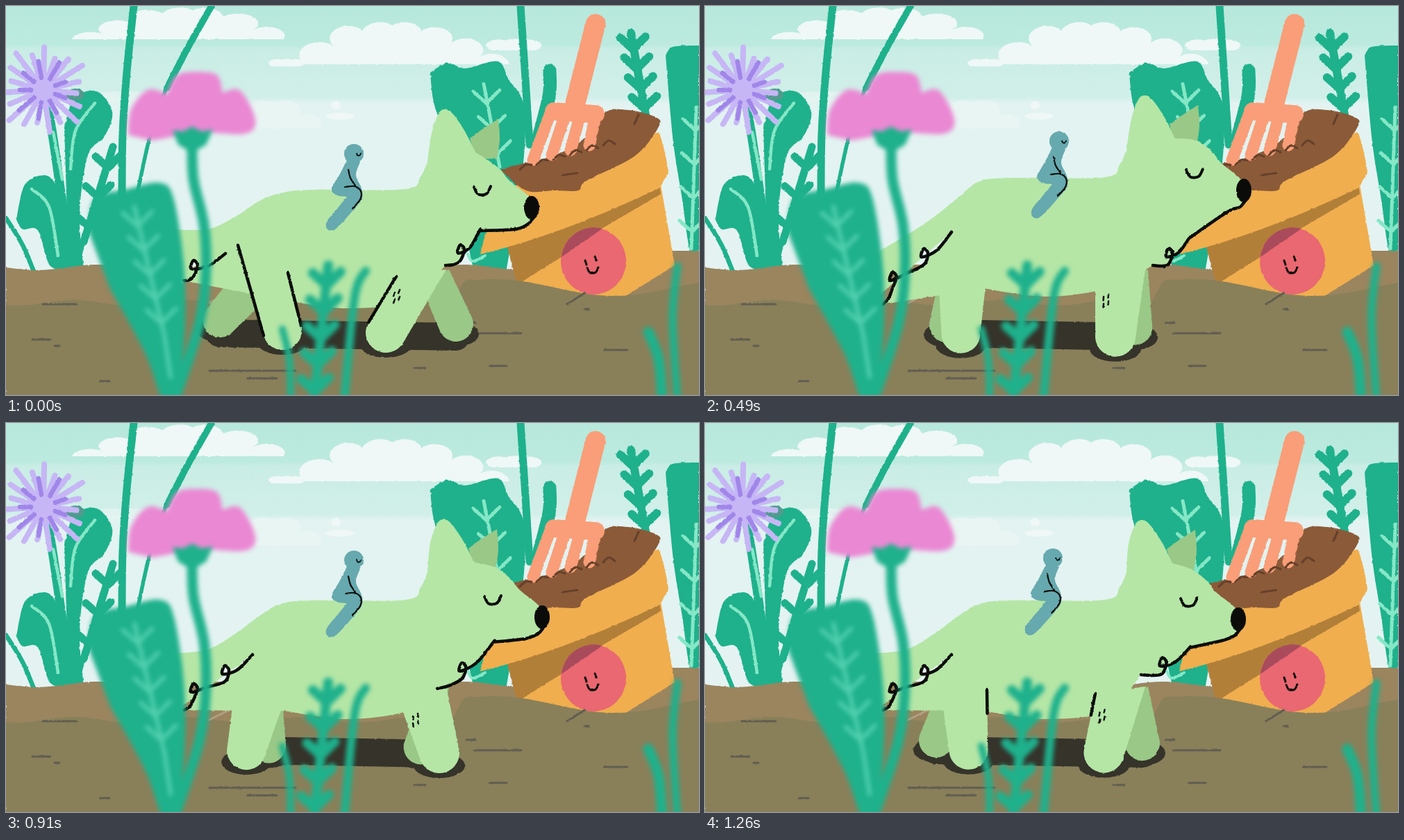
Animation, 998 px wide and 561 px high, one loop 1470 ms. Source, as an HTML page:

```html
<!DOCTYPE html>
<html lang="en">
<head>
<meta charset="utf-8">
<title>Garden walk</title>
<style>
html, body { margin: 0; width: 100%; height: 100%; overflow: hidden; background: #e5f3f2; }
svg { display: block; width: 100vw; height: 100vh; }
</style>
</head>
<body>
<svg viewBox="0 0 998 561" preserveAspectRatio="none">
  <defs>
    <linearGradient id="sky" x1="0" y1="0" x2="0" y2="1">
      <stop offset="0" stop-color="#b7e8dc"/>
      <stop offset=".1" stop-color="#bceadf"/>
      <stop offset=".11" stop-color="#c9ede5"/>
      <stop offset=".235" stop-color="#d1efe9"/>
      <stop offset=".25" stop-color="#e2f3f1"/>
      <stop offset="1" stop-color="#e6f3f3"/>
    </linearGradient>
    <filter id="rough" filterUnits="userSpaceOnUse" x="-10" y="-10" width="1018" height="601" color-interpolation-filters="sRGB">
      <feTurbulence type="fractalNoise" baseFrequency=".22" numOctaves="2" seed="4"/>
      <feDisplacementMap in="SourceGraphic" scale="2.5" xChannelSelector="R" yChannelSelector="G"/>
    </filter>
    <filter id="soft" filterUnits="userSpaceOnUse" x="-20" y="-20" width="1038" height="621" color-interpolation-filters="sRGB">
      <feGaussianBlur stdDeviation="3"/>
    </filter>
  </defs>
  <rect width="998" height="561" fill="url(#sky)"/>
  <g id="back" filter="url(#rough)"></g>
  <g id="dog" filter="url(#rough)"></g>
  <g id="front" filter="url(#soft)"></g>
</svg>
<script>
const GREEN = '#1eb18c', MINT = '#85e7c6', INK = '#0b0c0a', BOTTOM = 580;
const COAT = '#b5e6a6', FAR = '#9ac887', RIDER = '#66a9ae', SHADE = '#35332a';
const SOIL = '#8b5a39', CLAY = '#f0ae4e', PEACH = '#f99e78', CLOUD = '#eff8f6', PINK = '#ea88d3';

const range = (n, make) => Array.from({ length: n }, (_, i) => make(i));
const mix = (a, b, t) => a.map((v, k) => v + (b[k] - v) * t);
const at = ([x, y], dx, dy) => [x + dx, y + dy];

// Smooth curve through points; "/" makes a corner, "|" starts a new subpath.
function curve(text) {
  return text.split('|').map(part => {
    let d = '', last;
    for (const run of part.split('/')) {
      const p = run.trim().split(/\s+/).map(q => q.split(',').map(Number));
      if (last) p.unshift(last); else d = 'M' + p[0];
      for (let i = 0; i < p.length - 1; i++) {
        const a = p[i], b = p[i + 1], before = p[i - 1] || a, after = p[i + 2] || b;
        const c1 = a.map((v, k) => v + (b[k] - before[k]) / 6);
        const c2 = b.map((v, k) => v - (after[k] - a[k]) / 6);
        d += `C${c1} ${c2} ${b}`;
      }
      last = p.at(-1);
    }
    return d;
  }).join('');
}
const path = (d, fill) => `<path d="${d}" fill="${fill}"/>`;
const shape = (pts, fill) => path(curve(pts) + 'Z', fill);
const poly = (pts, fill) => path(`M${pts}Z`, fill);
const line = (pts, width = 4, color = INK) =>
  `<path d="${curve(pts)}" fill="none" stroke="${color}" stroke-width="${width}" stroke-linecap="round" stroke-linejoin="round"/>`;
const oval = (x, y, rx, ry, fill) => `<ellipse cx="${x}" cy="${y}" rx="${rx}" ry="${ry}" fill="${fill}"/>`;
const smile = (x, y, r, width) => line(`${x - r},${y - r * .4} ${x - r * .5},${y + r * .45} ${x + r * .5},${y + r * .4} ${x + r},${y - r * .5}`, width);

// Stem from tip to base with pairs of arms pointing up and outward.
function frond(x1, y1, x2, y2, pairs, arm, width, color) {
  const arms = range(pairs, i => {
    const [x, y] = mix([x1, y1], [x2, y2], (i + .5) / pairs);
    return `|${x - arm},${y - arm * .9}/${x},${y}/${x + arm},${y - arm}`;
  });
  return line(`${x1},${y1 - arm * .5} ${x2},${y2}` + arms.join(''), width, color);
}

// Flat-based cloud whose bumps rise toward its peak.
function cloud(x, base, width, height, bumps, peak = .5) {
  const top = t => base - height * Math.sin(Math.PI * t ** (Math.log(.5) / Math.log(peak))) ** 1.6;
  const arcs = range(bumps, i => `A${width / bumps * .6} ${height * .3} 0 0 1 ${x + width * (i + 1) / bumps} ${top((i + 1) / bumps)}`);
  return path(`M${x},${base}${arcs.join('')}Z`, CLOUD);
}

function burst(x, y) {
  const rays = (n, turn, near, far) => range(n, i => {
    const a = turn + i * 2 * Math.PI / n;
    return [near, far(i)].map(r => `${x + Math.cos(a) * r},${y + Math.sin(a) * r}`).join(' ');
  }).join('|');
  return line(rays(19, .1, 3, i => 48 + i * 7 % 5 * 4.5), 8, '#c6b6f5')
    + line(rays(9, .35, 18, i => 34 + i * 5 % 4 * 4), 6.5, '#a086e9');
}

const clouds = () => cloud(95, 48, 304, 42, 7, .55) + cloud(430, 84, 295, 56, 7, .42)
  + cloud(384, 87, 40, 12, 3) + cloud(700, 64, 62, 18, 3)
  + `<g opacity=".5">${cloud(142, 138, 58, 14, 2) + cloud(320, 177, 130, 40, 4, .4)}</g>`
  + oval(481, 159, 21, 5, CLOUD) + oval(475, 143, 7, 6, CLOUD);

const leftPlants = () => line('184,0 174,95 168,185 167,275', 11, GREEN)
  + line('296,0 262,60 232,118', 9.5, GREEN) + line('230,120 208,185 190,266', 5.5, GREEN)
  + line('0,306 24,345 44,393', 6.5, GREEN) + line('60,145 70,205 95,385', 13, GREEN)
  + shape('84,175 98,133 130,123 153,152 142,188 118,215 106,300 112,380/ 90,372', GREEN)
  + shape('18,290 30,254 66,249 90,320 102,376/ 65,376 46,324 24,322 15,308', GREEN)
  + frond(154, 212, 112, 340, 3, 18, 11, GREEN) + line('114,330 98,390 128,380', 9, GREEN)
  + line('128,140 100,180 93,235|37,264 62,290 75,360|68,182 81,250', 4.5, MINT)
  + oval(100, 128, 13, 9, '#509b8e') + burst(54, 121);

const rightPlants = () => line('741,0 747,90 754,200', 11, GREEN)
  + line('783,93 782,130 764,200', 19, GREEN)
  + shape('611,96 636,82 662,90 708,80 724,106 746,145 744,236 720,385/ 695,392 674,381 640,210 617,143 611,96', GREEN)
  + frond(688, 122, 711, 232, 3, 19, 5, MINT) + line('665,358 672,368 690,360', 4, MINT)
  + frond(900, 48, 922, 162, 4, 18, 12, GREEN)
  + shape('950,72 960,59 998,57/ 998,352/ 985,352 974,280 962,205 955,135', GREEN)
  + frond(994, 155, 987, 350, 4, 18, 5, MINT);

function hill(height, color) {
  const top = range(51, i => `${i * 20},${height(i * 20)}`).join(' ');
  return shape(`${top}/ 1000,${BOTTOM}/ 0,${BOTTOM}`, color);
}
const farHill = x => x > 920 ? 353 : 377 + 4 * Math.sin(x / 28);
const nearHill = x => x > 640 ? 406 + 12 * Math.sin((x - 790) / 55) : 428 + 4 * Math.sin(x / 26 + 1);

function fork() {
  const tines = range(4, i => `${783 + 22 * i},157 ${759 + 27 * i},${222 - 7 * i}`).join('|');
  return line('849,26 820,140', 29, PEACH) + line('789,152 849,156', 26, PEACH) + line(tines, 17, PEACH);
}

function pot() {
  const clods = range(6, i => `${740 + 24 * i},${236 - 7 * i} ${748 + 24 * i},${229 - 7 * i} ${757 + 24 * i},${229 - 6 * i}`).join('|');
  return poly('722,340 737,402 880,426 963,374 943,258', CLAY)
    + poly('720,340 941,258 943,271 858,321 800,362 736,402', '#b27f39')
    + path('M683,358L690,330L735,258L940,182Q949,205 954,239L942,262Q800,330 683,358Z', CLAY)
    + shape('712,236 740,228 782,218 827,196 862,154 896,150 935,160 940,174 906,216 836,252 824,266 790,266 756,268 735,258', SOIL)
    + fork() + line(clods + '|905,170 911,157|801,244 822,241', 3, '#65402a');
}

const ball = () => oval(846, 368, 47, 48, '#e96871')
  + path('M859,321L800,362A47 48 0 0 1 859,321Z', '#a94b5b')
  + line('834,367 836,373|848,361 850,367', 3) + smile(845, 381, 8, 3);

const scratches = [[53, 430, 49], [38, 481, 26], [70, 490, 7], [135, 541, 14], [293, 526, 124], [348, 537, 42],
  [674, 472, 68], [663, 457, 13], [588, 522, 16], [697, 519, 24], [862, 496, 33], [833, 437, 6]];
const marks = scratches.map(([x, y, w]) => `${x},${y} ${x + w},${y}`).join('|') + '|808,430 833,414';

back.innerHTML = clouds() + leftPlants() + rightPlants() + hill(farHill, '#9a855f') + pot()
  + hill(nearHill, '#89805a') + ball() + line(marks, 3, '#615d50') + line('293,428 329,410', 3, '#b2a082');

front.innerHTML =
  shape('176,186 180,150 204,121 232,127/ 246,100 276,95 304,100 312,125/ 337,122 359,163 345,184 280,183 210,194', PINK)
  + line('268,195 270,250 285,315 288,380 278,460 242,570', 15, GREEN)
  + poly('240,179 255,181 268,174 282,181 298,178 288,200 268,212 248,200', GREEN)
  + shape('119,325 128,278 175,264 222,255 242,280 257,385 256,490 242,570/ 226,570 200,500 150,408', GREEN)
  + frond(185, 300, 228, 475, 5, 21, 6, '#50cfae') + line('228,475 237,535', 6, '#50cfae')
  + frond(464, 384, 443, 575, 5, 20, 14, GREEN)
  + line('398,466 408,510 410,570', 10, GREEN) + line('518,382 502,420 487,570', 12, GREEN)
  + line('925,470 940,510 945,570', 15, GREEN) + line('967,375 960,450 967,570', 11, GREEN);

// Hanging curls: sagging spans joined by a small loop at each inner knot.
function garland(knots) {
  const pts = [knots[0]];
  knots.slice(1).forEach((knot, i) => {
    pts.push(at(mix(knots[i], knot, .6), 2, 8));
    if (i < knots.length - 2) pts.push(at(knot, -4, 5), at(knot, -1, -7), at(knot, 5, 0), at(knot, -1, 16));
    else pts.push(knot);
  });
  return pts;
}

function leg(a, b, x, bottom, r) {
  const y = bottom - r, [mx, my] = mix(a, b, .5), len = Math.hypot(x - mx, y - my);
  const nx = (y - my) / len * r, ny = (mx - x) / len * r;
  const left = [x - nx, y - ny], right = [x + nx, y + ny];
  return { a, b, x, bottom, r, left, right, d: `M${a}L${left}A${r} ${r} 0 0 0 ${right}L${b}Z` };
}

const rider = oval(501, 213, 14, 14, RIDER)
  + shape('491,222/ 481,242 469,264 477,273 491,275/ 478,291 462,311 463,322 474,322 496,299 512,279 512,263 504,244 510,225', RIDER)
  + line('493,236 496,248 503,259|489,261 502,260 511,267 510,279 499,292', 2.2)
  + smile(508, 214, 3, 1.8);

function drawDog({ swing, rise, ear, nose, throat, chest, curls = 2, edge = 0 }) {
  const back = 264 - rise, s2 = swing * swing;
  const frontLeg = leg([562, 390], [634, 380], 602 + 55 * swing, 506 - 6 * s2, 29);
  const rearLeg = leg([334, 345], [406, 385], 361 - 37 * swing, 501 - 5 * s2, 28);
  const farFront = leg([596, 400], [638, 380], 612 - 36 * swing, 490 + 6 * swing, 25);
  const farRear = leg([342, 370], [398, 400], 358 + 50 * swing, 487 + 9 * swing, 25);
  const legs = [frontLeg, rearLeg, farFront, farRear], feet = legs.map(l => l.x);

  const tail = garland([[355, 343 - rise], [316, 357], [271, 374 + rise], [256, 396 + rise * 2]].slice(2 - curls));
  const bib = garland([throat, mix(throat, chest, .55), chest]);
  const chin = [at(nose, 2, 15), at(nose, -6, 24), at(nose, -24, 31), throat];
  const outline = [
    [240, 322 + rise * rise * .13], [290, 322 + rise * .5], [330, 304], [365, 281 - rise * .3],
    [395, back + 6], [440, back + 1], [575, back], [597, back - 18], [607, back - 40], '/',
    at(ear, -20, 34), at(ear, -10, 6), ear, at(ear, 11, 7), at(ear, 28, 32), at(ear, 43, 62), '/',
    at(nose, -68, -72), at(nose, -46, -56), at(nose, -32, -39), at(nose, -4, -16), at(nose, 6, 4), ...chin, '/',
    ...bib, '/', [580, back + 160], [490, back + 172], [400, back + 160], '/', ...tail.toReversed(), '/', [240, 410 + rise]
  ].join(' ');

  let ink = [[...chin, '/', ...bib].join(' '), tail.join(' ')].join('|');
  if (edge) ink += `|${frontLeg.a} ${mix(frontLeg.a, frontLeg.left, edge)}|${rearLeg.b} ${mix(rearLeg.b, rearLeg.right, edge)}`;
  if (edge === 1) ink += `|${rearLeg.a} ${rearLeg.left}`;

  const [sx, sy] = at(mix(frontLeg.a, frontLeg.left, .35), 12, 0);
  const spots = range(4, i => {
    const x = sx + i % 2 * 7, y = sy + (i >> 1) * 10 - i % 2 * 4;
    return `${x},${y} ${x + 2 * swing},${y + 5}`;
  }).join('|');

  return line(`${Math.min(...feet)},472 ${Math.max(...feet)},477`, 40, SHADE)
    + legs.map(l => oval(l.x, l.bottom - 11, l.r + 8, 18, SHADE)).join('')
    + shape(`${at(ear, 35, 42)} ${at(ear, 54, 28)} ${at(ear, 76, 14)}/ ${at(ear, 78, 44)} ${at(ear, 74, 72)}/ ${at(ear, 43, 70)}`, FAR)
    + path(farFront.d, FAR) + path(farRear.d, FAR)
    + shape(outline, COAT) + path(rearLeg.d, COAT) + path(frontLeg.d, COAT)
    + line(ink, 4.5) + line(spots, 2.5) + oval(...nose, 11, 17, INK) + smile(...at(nose, -71, -25), 12, 4);
}

const reach = { swing: -1, rise: 0, ear: [633, 149], nose: [757, 291], throat: [682, 324], chest: [633, 374], curls: 1, edge: 1 };
const pass = { swing: -.5, rise: 9, ear: [630, 140], nose: [768, 283], throat: [698, 324], chest: [628, 363], edge: .4 };
const stand = { swing: -.2, rise: 17, ear: [634, 129], nose: [776, 266], throat: [697, 335], chest: [645, 374] };
const stride = { swing: 1, rise: 0, ear: [634, 148], nose: [771, 287], throat: [704, 326], chest: [637, 396] };
const lift = { swing: .4, rise: 9, ear: [631, 139], nose: [772, 280], throat: [702, 316], chest: [621, 383] };

const steps = [
  { pose: reach, hold: 280, seat: [0, 0] },
  { pose: pass, hold: 210, seat: [10, -12] },
  { pose: stand, hold: 140, seat: [9, -18] },
  { pose: stride, hold: 280, seat: [0, -6] },
  { pose: lift, hold: 210, seat: [0, -15] },
  { pose: stand, hold: 140, seat: [-1, -21] },
  { pose: pass, hold: 210, seat: [0, -18] }
];
const loop = steps.reduce((sum, s) => sum + s.hold, 0);
let shown = -1;

function update(time) {
  let t = time % loop, i = 0;
  while (t >= steps[i].hold) t -= steps[i++].hold;
  if (i === shown) return;
  shown = i;
  dog.innerHTML = drawDog(steps[i].pose) + `<g transform="translate(${steps[i].seat})">${rider}</g>`;
}

const start = performance.now();
function tick() {
  update(performance.now() - start);
  requestAnimationFrame(tick);
}
tick();
</script>
</body>
</html>
```
